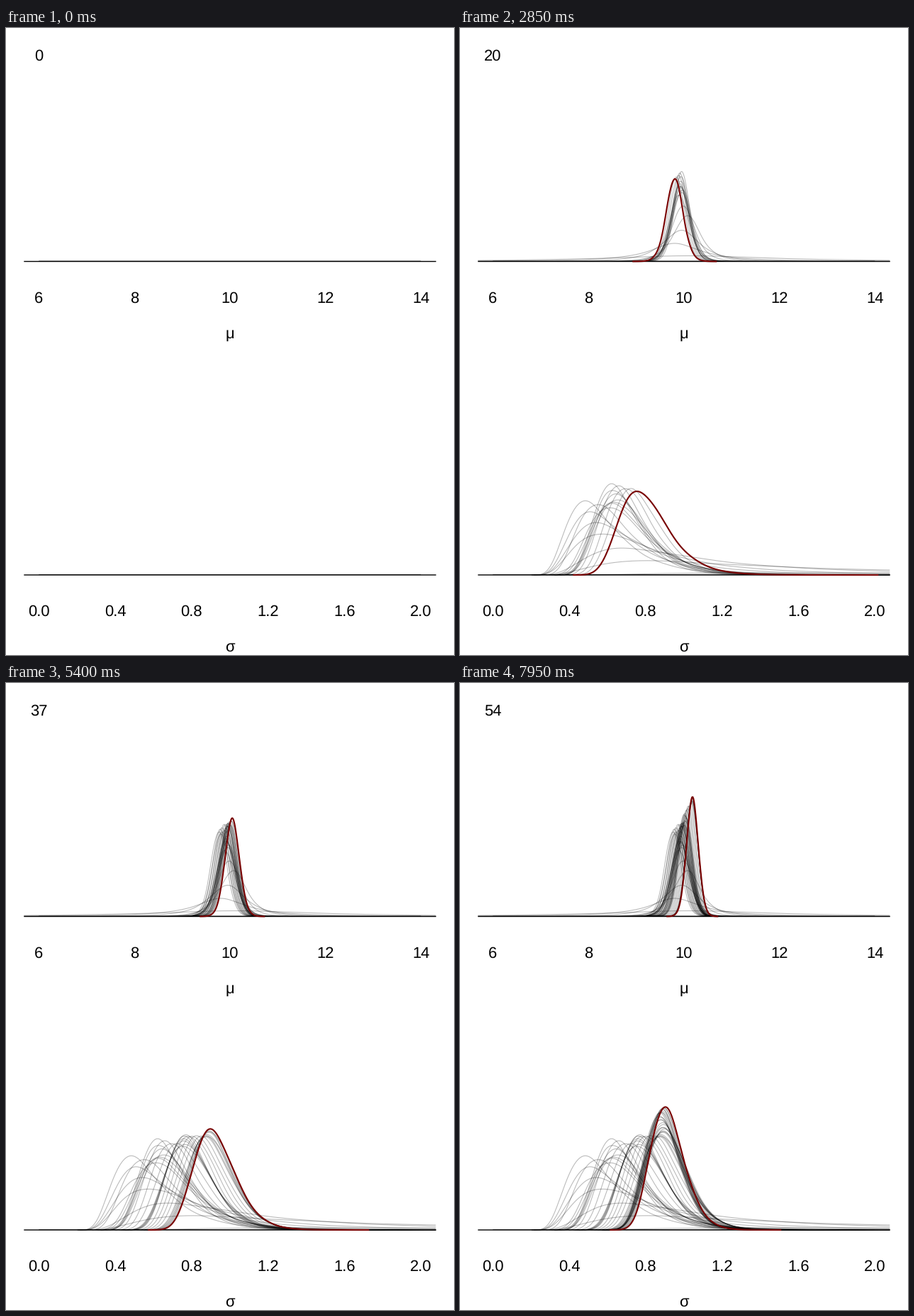
Write a matplotlib script that moves like this. It is 632x885 px and loops after 8000 ms.

```python
"""Posterior densities of a normal mean and standard deviation as data arrive."""
import math
import random

import matplotlib.pyplot as plt
import numpy as np
from matplotlib.animation import FuncAnimation

W, H, DPI = 632, 885, 100
PX = 72 / DPI
INTERVAL, FRAMES, HOLD = 50, 160, 3
LEFT, RIGHT, AXIS_LEFT, AXIS_RIGHT = 25.3, 606.7, 46.3, 585.2
MU_BASE, SIGMA_BASE = 329.5, 772.0
MU_UNIT = (AXIS_RIGHT - AXIS_LEFT) / 8
SIGMA_UNIT = (AXIS_RIGHT - AXIS_LEFT) / 2
MU_HEIGHT, SIGMA_HEIGHT = 52, 38.5
LAST = 54

# Turning points of the estimates: number of observations -> posterior mode
SIGMA_PATH = {2: 1.5, 3: 0.8, 5: 0.57, 8: 0.48, 10: 0.61, 13: 0.65, 16: 0.62,
              20: 0.76, 25: 0.765, 30: 0.87, 37: 0.9, 45: 0.87, 54: 0.9}
MU_PATH = {2: 10.1, 3: 9.82, 5: 10.07, 7: 9.9, 11: 9.97, 13: 9.915, 16: 9.96,
           21: 9.77, 28: 10.02, 31: 9.95, 37: 10.05, 40: 10.0, 47: 10.17, 54: 10.18}

plt.rcParams["text.hinting"] = "none"
plt.rcParams["lines.solid_capstyle"] = "butt"
random.seed(4)
xs = np.arange(LEFT, RIGHT + 0.1, 1.0)


def along(path, n):
    return np.interp(n, list(path), list(path.values()))


def student(n, mu, sigma):
    """Marginal density of the mean: standardised x, unit-peak shape, peak in px."""
    df = max(n - 2, 1)
    scale = sigma * math.sqrt((n - 1) / (n * df)) if n > 2 else 2.1
    t = ((xs - AXIS_LEFT) / MU_UNIT + 6 - mu) / scale
    shape = (1 + t**2 / df) ** (-(df + 1) / 2)
    log_peak = math.lgamma((df + 1) / 2) - math.lgamma(df / 2)
    peak = math.exp(log_peak) / math.sqrt(df * math.pi) / scale
    return t, shape, peak * MU_HEIGHT


def inverse_chi(n, sigma):
    """Marginal density of the standard deviation, same form as above."""
    p = n - 1
    r = np.maximum((xs - AXIS_LEFT) / SIGMA_UNIT / sigma, 1e-3)
    shape = np.exp(-p * np.log(r) - p / 2 * (r**-2.0 - 1))
    if p == 1:  # improper, drawn nearly flat
        return r, shape, 3
    log_peak = (p - 1) / 2 * math.log(p / 2) - p / 2 - math.lgamma((p - 1) / 2)
    peak = 2 * math.exp(log_peak) / sigma
    return (r - 1) * math.sqrt(2 * p), shape, peak * SIGMA_HEIGHT


def curve(base, density, cutoff):
    """Pixel path of a density with the slight unevenness of a sampled estimate."""
    z, shape, height = density
    wobble = 1 + 0.012 * np.sin(4 * z + random.uniform(0, 2 * math.pi))
    keep = shape > cutoff
    return xs[keep], base - (height * shape * wobble)[keep]


curves = []
for n in range(2, LAST + 1):
    mu, sigma = along(MU_PATH, n), along(SIGMA_PATH, n)
    curves.append((curve(MU_BASE, student(n, mu, sigma), 2e-4),
                   curve(SIGMA_BASE, inverse_chi(n, sigma), 3e-5)))

fig = plt.figure(figsize=(W / DPI, H / DPI), dpi=DPI, facecolor="white")
ax = fig.add_axes([0, 0, 1, 1])
ax.set(xlim=(0, W), ylim=(H, 0))
ax.axis("off")


def label(x, baseline, text):
    return ax.text(x, baseline, text, family="Liberation Sans", size=22 * PX,
                   color="black", ha="center", va="baseline")


def draw_axis(base, ticks, name):
    ax.plot([LEFT, RIGHT], [base, base], color="black", lw=1.4 * PX,
            snap=False, zorder=1)
    ax.plot([AXIS_LEFT, AXIS_RIGHT], [base - 0.5] * 2, color="black",
            lw=1 * PX, alpha=0.6, snap=False, zorder=1)
    for x, text in zip(np.linspace(AXIS_LEFT, AXIS_RIGHT, len(ticks)), ticks):
        label(x, base + 58, text)
    label(315.7, base + 108, name)


draw_axis(MU_BASE, ["6", "8", "10", "12", "14"], "μ")
draw_axis(SIGMA_BASE, ["0.0", "0.4", "0.8", "1.2", "1.6", "2.0"], "σ")
counter = label(46.6, 45.5, "0")

past = [[ax.plot(*path, color="black", alpha=0.27, lw=1.1 * PX, visible=False, zorder=2)[0]
         for path in pair] for pair in curves]
current = [ax.plot([], [], color="#780000", lw=2.1 * PX, zorder=3)[0] for _ in range(2)]


def update(frame):
    step = frame // HOLD
    counter.set_text(str(step + 1 if step else 0))
    for i, pair in enumerate(past):
        for line in pair:
            line.set_visible(i < step - 1)
    for j, line in enumerate(current):
        line.set_data(*(curves[step - 1][j] if step else ([], [])))
    return [counter, *current]


anim = FuncAnimation(fig, update, frames=FRAMES, interval=INTERVAL,
                     repeat=True, repeat_delay=0, blit=False)
plt.show()
```
